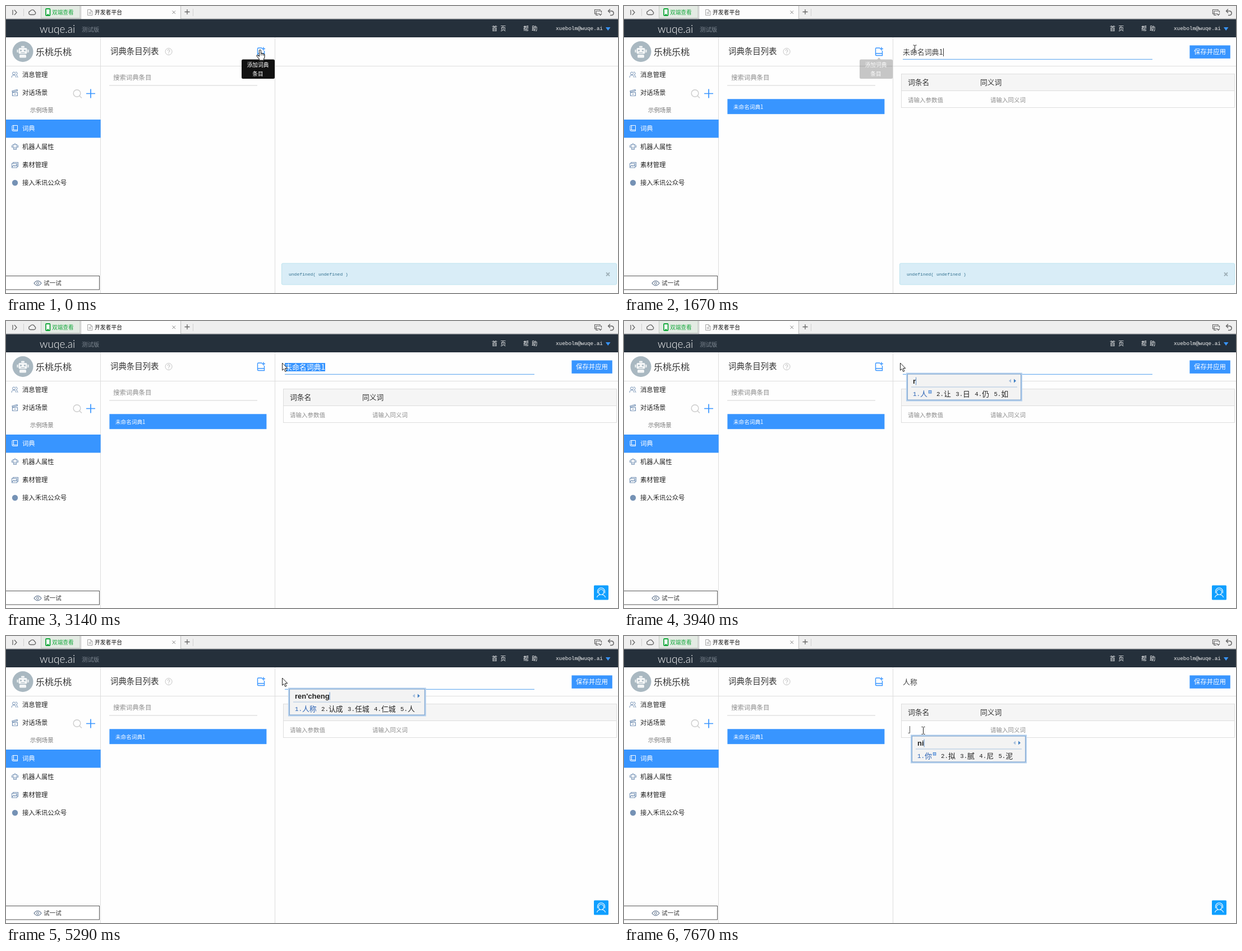
These frames come from a looping animation (1091x513 px, 8000 ms). An HTML page:

```html
<!DOCTYPE html>
<html lang="zh-CN">
<head>
<meta charset="utf-8">
<title>开发者平台</title>
<style>
html, body { margin: 0; width: 100%; height: 100%; overflow: hidden; background: #fff; }
svg { display: block; width: 1091px; height: 513px; font-family: "Noto Sans CJK SC", "Noto Sans CJK", sans-serif; font-weight: 300; }
text { white-space: pre; }
.mono { font-family: "Liberation Mono", monospace; }
.ime { font-family: "Liberation Sans", sans-serif; font-weight: bold; }
.word { font-family: Lato, sans-serif; }
</style>
</head>
<body>
<svg id="stage" viewBox="0 0 1091 513"><g id="base"></g><g id="live"></g></svg>
<script>
const LOOP = 8000, BLUE = '#3895ff', INK = '#333', PALE = '#8c8c8c', RULE = '#ddd';

const text = (x, mid, size, s, fill = INK, more = '') =>
  `<text x="${x}" y="${(mid + size * 0.37).toFixed(2)}" font-size="${size}" fill="${fill}" ${more}>${s}</text>`;
const rect = (x, y, w, h, fill, more = '') =>
  `<rect x="${x}" y="${y}" width="${w}" height="${h}" fill="${fill}" ${more}/>`;
const line = (d, stroke, width = 1, more = '') =>
  `<path d="${d}" fill="none" stroke="${stroke}" stroke-width="${width}" ${more}/>`;
const shape = (d, fill, more = '') => `<path d="${d}" fill="${fill}" ${more}/>`;
const dot = (x, y, r, fill, more = '') => `<circle cx="${x}" cy="${y}" r="${r}" fill="${fill}" ${more}/>`;
const move = (x, y, s) => `<g transform="translate(${x} ${y})">${s}</g>`;

// Latest value whose start time has passed.
const at = (t, steps) => {
  let now = null;
  for (const [start, value] of steps) if (t >= start) now = value;
  return now;
};

function browserBar() {
  return rect(0, 0, 1091, 24, '#efefef') + line('M0 22.5H1091', '#c4c4c4') +
    line('M12 7V16M15 7L19 11.5L15 16', '#666', 1.3) + line('M31.5 5V18M333.5 5V18', '#d0d0d0') +
    line('M43.5 15.5H50A3 3 0 0 0 51 9.8A4.2 4.2 0 0 0 43.2 9.2A3.2 3.2 0 0 0 43.5 15.5Z', '#666', 1.3) +
    rect(62.5, -1, 69, 22.5, '#e4ebe4', 'stroke="#c4c9c4"') +
    rect(71, 5, 7.5, 12, '#fff', 'rx="1" stroke="#14a83b" stroke-width="1.8"') + rect(73, 14.5, 3.5, 1.5, '#14a83b') +
    text(82, 11, 9.7, '双端查看', '#14a83b') +
    rect(133.5, -1, 178, 25, '#fdfdfd', 'stroke="#bbb"') +
    line('M145.5 6.5H151L154 9.5V16.5H145.5ZM151 6.5V9.5H154M147.5 11.5H152M147.5 13.5H152', '#999', .9) +
    text(158, 11, 9.8, '开发者平台', '#111') +
    line('M296.5 8.5L302 14M302 8.5L296.5 14', '#888') +
    line('M318.5 10.5H327.5M323 6V15', '#666', 1.3) +
    line('M1057 14H1049.5V6.5H1059V8M1052 9H1061.5V12M1052 9V16.5H1056M1057 13.5L1059.5 16.5L1062 13.5', '#666', 1.2) +
    line('M1077 5.5L1073.5 9L1077 12.5M1074 9H1080A3.8 3.8 0 0 1 1080 16.5H1077', '#666', 1.4);
}

function header() {
  return rect(0, 23.5, 1091, 32.5, '#25303b') +
    text(60, 41, 19, 'wuqe.ai', '#fff', 'class="word"') +
    text(135, 42, 10.4, '测试版', '#7d8791') +
    text(866, 40, 10, '首 页', '#fff', 'word-spacing="3"') + text(922, 40, 10, '帮 助', '#fff', 'word-spacing="3"') +
    text(980, 39.5, 9.33, 'xuebolm@wuqe.ai', '#f2f2f2', 'class="mono"') +
    shape('M1069 38H1077.5L1073.2 44Z', BLUE);
}

function robot() {
  const tone = '#a9b8c1';
  return dot(30, 81.5, 18.5, tone) +
    rect(22.5, 75, 15, 10.5, '#f4f6f7', 'rx="2"') + rect(19.5, 78, 2, 5, '#f4f6f7') + rect(38.5, 78, 2, 5, '#f4f6f7') +
    rect(27, 71.5, 6, 3, '#f4f6f7', 'rx="1"') +
    dot(26.5, 79.5, 1.6, tone) + dot(33.5, 79.5, 1.6, tone) + rect(26.5, 83, 7, 1, tone) +
    rect(24, 87, 12, 5.5, '#f4f6f7', 'rx="1.5"');
}

function sidebar() {
  const items = ['消息管理', '对话场景', '', '词典', '机器人属性', '素材管理', '接入禾讯公众号'];
  const mids = [123, 155, 0, 219, 252, 284, 316];
  const icon = '#7592b5';
  return robot() + text(53, 82.3, 16, '乐桃乐桃') +
    rect(0, 203, 168.7, 32.5, BLUE) +
    items.map((s, i) => s && text(29, mids[i], 11.35, s, i === 3 ? '#fff' : '#222')).join('') +
    text(43, 186, 10.4, '示例场景', '#777') +
    line('M10 128Q10 123.5 14 123.5Q18 123.5 18 128M14 123A2.5 2.5 0 1 1 14 118A2.5 2.5 0 0 1 14 123M17 118A2.5 2.5 0 0 1 18 123Q21 124 21 128', icon) +
    line('M11.5 154.5H20.5V160.5H11.5ZM11.5 154.5L11 152L20 149.5L20.5 151.5L11.5 154M14 157.5H18', icon, 1.2) +
    line('M11.5 213.5H20.5V223.5H12.5Q11 223.5 11 222V214M13.5 213.5V221M11.5 221.5H20.5', '#fff') +
    line('M12.5 247.5H19.5V253.5H12.5ZM16 247V245M10.5 249V253M21.5 249V253M13 256.5H19M14 254V257M18 254V257M14.5 250V251M17.5 250V251', icon, 1.1) +
    line('M10.5 281.5H19.5V289H10.5ZM12.5 281V279.5H21.5V287H20M11 287.5L14 284.5L16 286.5L18 284L19.5 285.5', icon, 1.1) +
    dot(16, 316, 5.2, icon) +
    dot(126.5, 156, 6.3, 'none', 'stroke="#ccc" stroke-width="1.4"') + line('M131 160.5L135 164.5', '#ccc', 1.4) +
    line('M143 156.5H159M151 148.5V164.5', BLUE, 1.7) +
    rect(-1, 482.5, 167.5, 24.5, '#fff', 'stroke="#555"') +
    line('M50 495.5Q56.5 487 63 495.5Q56.5 504 50 495.5Z', '#566b86', 1.1) +
    dot(56.5, 495.5, 2, 'none', 'stroke="#566b86"') +
    text(67, 495.5, 10.6, '试一试');
}

function middle() {
  return text(186, 81, 14.4, '词典条目列表') +
    dot(290, 81.5, 6, 'none', 'stroke="#c4c4c4"') +
    line('M288 80A2 2 0 1 1 290 82V83.3M290 84.3V85.5', '#bbb') +
    line('M456.5 75H450Q448.5 75 448.5 76.5V87Q448.5 88.5 450 88.5H460.5V80M448.5 86Q448.5 84.8 450 84.8H460.5M459 73.5V79.5M456 76.5H462', BLUE, 1.4) +
    text(191, 128, 11.4, '搜索词典条目', PALE) + line('M184 142H448', '#d2d2d2');
}

function base() {
  return rect(0, 0, 1091, 513, '#fefefe') + browserBar() + header() +
    line('M168.5 56V513M479.5 56V513M0 107.5H1091', RULE) + sidebar() + middle();
}

function table(row) {
  return rect(494.5, 121.5, 594, 60, '#fefefe', `stroke="${RULE}"`) +
    rect(494.5, 121.5, 594, 30, '#f5f5f5', `stroke="${RULE}"`) +
    text(506, 136, 12.8, '词条名') + text(635, 136, 12.8, '同义词') +
    (row ? text(506, 168, 10.5, '请输入参数值', PALE) : '') + text(653, 168, 10.5, '请输入同义词', PALE);
}

function tooltip(alpha) {
  return `<g opacity="${alpha}">` + rect(420, 95.5, 59, 34.5, '#111', 'rx="2.5"') + shape('M451 96L454.5 92L458 96Z', '#111') +
    text(449, 105, 9.7, '添加词典', '#fff', 'text-anchor="middle"') +
    text(449, 121, 9.7, '条目', '#fff', 'text-anchor="middle"') + '</g>';
}

const alertBox = alpha => `<g opacity="${alpha}">` +
  rect(491.5, 460, 597, 38, '#d9edf7', 'rx="2" stroke="#bce3ee"') +
  text(504, 479, 8.03, 'undefined( undefined )', '#31708f', 'class="mono"') +
  line('M1070 476.5L1076 482.5M1076 476.5L1070 482.5', '#9fb0b8', 1.8) + '</g>';

const helpButton = alpha => `<g opacity="${alpha}">` + rect(1048, 472.5, 26, 26, '#0f9fff', 'rx="1.5"') +
  dot(1061, 484.5, 4.7, 'none', 'stroke="#fff" stroke-width="1.1"') +
  line('M1054.5 486.5V483.5A6.5 6.5 0 0 1 1067.5 483.5V486.5M1053.5 494Q1055 489.8 1059 489.3M1063 489.3Q1067 489.8 1068.5 494', '#fff', 1.1) + '</g>';

function title(s, sel) {
  const label = fill => text(497, 82.5, 12.9, s, fill);
  if (sel === null) return label('#444');
  return label('#444') + `<clipPath id="sel">${rect(sel, 75, 569 - sel, 15, '#000')}</clipPath>` +
    rect(sel, 75, 569 - sel, 15, BLUE) + `<g clip-path="url(#sel)">${label('#fff')}</g>`;
}

// Input-method window: typed letters above five numbered candidates.
function ime(x, y, typed, words, star) {
  const em = 12.9;
  const caretX = 11.5 + [...typed].reduce((sum, c) => sum + 13 * ({ r: .39, i: .28, "'": .24, n: .61, h: .61, g: .61 }[c] || .556), 0);
  let pen = 11, list = '';
  words.split(' ').forEach((w, i) => {
    const fill = i ? '#222' : '#2b62b4';
    list += text(pen, 36.8, 10.75, i + 1 + '.', fill, 'class="mono"') + text(pen + em, 36.5, em, w, fill);
    pen += em * (1 + w.length);
    if (!i && star) {
      list += rect(pen + 2.5, 31, 4.5, 4.5, '#dceaff', 'stroke="#3c7ccc"') + rect(pen + 4, 32.5, 1.5, 1.5, '#3c7ccc');
      pen += 8;
    }
    pen += 8.3;
  });
  const w = Math.max(205, pen - 8.3 + 19);
  return move(x, y, rect(.5, .5, w - 1, 48, '#f3f3f3', 'stroke="#b3cfed" stroke-width="3"') +
    rect(1.5, 1.5, w - 3, 46, '#f3f3f3', 'stroke="#7ba1cc"') +
    text(11, 13.6, 13, typed, '#222', 'class="ime"') + line(`M${caretX} 7V21`, '#5b8dc8') +
    line(`M8 24.5H${w - 8}`, '#a8c2df') +
    shape(`M${w - 23} 13.5L${w - 19} 10V17Z`, '#a5bfdd') + shape(`M${w - 10} 13.5L${w - 14} 10V17Z`, '#3f7fc4') + list);
}

const cursors = {
  arrow: shape('M0 0V13.2L3 10.5L5.2 15.5L7.4 14.5L5.2 9.6H9.3Z', '#fff', 'stroke="#222" stroke-width="1"'),
  beam: line('M-3 -6.5H-1L0 -5.5L1 -6.5H3M0 -5.5V5.5M-3 6.5H-1L0 5.5L1 6.5H3', '#222', 1),
  hand: shape('M-1.5 9V1.5Q0 -1 1.5 1.5V7Q3 5.5 4 7.3Q5.5 6.3 6.3 8Q8 7.5 8 9.5V13Q8 15 6.5 16.5V19H-1.5V17L-6 11.5Q-6.3 9 -4 10L-1.5 12Z', '#fff', 'stroke="#222" stroke-width="1.1" stroke-linejoin="round"') +
    line('M1.5 7V10.5M4 7.5V10.5M6.3 8.5V11', '#222', .8)
};

const pointer = [
  [0, ['hand', 453, 78]], [1670, ['beam', 518.5, 76.5]], [1820, ['beam', 535.5, 76]], [1940, ['beam', 556.5, 76]],
  [2060, ['beam', 575.5, 76]], [2180, ['beam', 590.5, 76]], [2330, ['beam', 591.5, 81]], [2480, ['beam', 566.5, 80]],
  [2600, ['beam', 528.5, 78]], [2720, ['beam', 498.5, 76]], [2870, ['arrow', 492.5, 75]], [6280, ['arrow', 500, 142.5]],
  [6430, ['arrow', 509, 160]], [6550, ['arrow', 522.5, 182]], [6700, ['beam', 533.5, 169]]
];
const typing = [
  [3940, ['r', '人 让 日 仍 如', 1]], [4190, ['re', '热 惹 若 喏 偌', 0]], [4470, ['ren', '人 任 认 仁 忍', 1]],
  [4930, ["ren'ch", '人称 认出 人丑 人吃 人场', 0]], [5050, ["ren'che", '人车 认车 人车分离 人撤 仁车', 0]],
  [5170, ["ren'chen", '人臣 人沉 认沉 仁臣 忍沉', 0]], [5290, ["ren'cheng", '人称 认成 任城 仁城 人', 0]],
  [5750, null], [7550, ['n', '你 呢 那 能 年', 1]], [7670, ['ni', '你 拟 腻 尼 泥', 1]]
];
const titles = [[0, ''], [1250, '未命名词典1'], [3390, ''], [5750, '人称']];
const selection = [[0, null], [2480, 561.5], [2600, 523], [2720, 497], [3390, null]];
const titleCaret = [[1400, 569.5], [2480, null], [3390, 497.5], [3940, null], [5750, 523.5], [6280, null], [6430, 523.5], [6850, null]];
const listAlpha = [[0, 0], [1400, .4], [1520, .75], [1670, 1]];
const tipAlpha = [[0, 1], [1670, .23], [1820, .12], [1940, .04], [2060, 0]];
const swap = [[0, 0], [3020, .5], [3140, 1]];

function scene(t) {
  let out = '';
  const list = at(t, listAlpha), tip = at(t, tipAlpha), swapped = at(t, swap);
  if (list) out += `<g opacity="${list}">${rect(184.4, 166.3, 280, 26.9, BLUE)}${text(195, 180, 9.65, '未命名词典1', '#fff')}</g>`;
  if (t >= 1250) {
    out += rect(1008.4, 70.4, 72.4, 23.4, BLUE) + text(1016, 82, 11.4, '保存并应用', '#fff') + table(t < 7550);
    if (t >= 1400 && t < 6850) out += line('M497 95.3H942', '#509fee');
    out += title(at(t, titles), at(t, selection));
    if (t >= 3390 && t < 3940) out += text(497, 82.5, 12.6, '请输入词典名称', PALE);
    const caret = at(t, titleCaret);
    if (caret) out += line(`M${caret} 75.5V90`, '#333');
    if (t >= 6850 && t < 7400) out += line('M506.5 161V174', '#333');
    if (t >= 7550) out += line('M509.5 161V173.5H506.5', '#555');
  }
  if (swapped < 1) out += alertBox(1 - swapped);
  if (swapped) out += helpButton(swapped);
  if (tip) out += tooltip(tip);
  const keys = at(t, typing);
  if (keys) out += t < 7000 ? ime(504, 93.5, ...keys) : ime(512, 177.5, ...keys);
  const [kind, x, y] = at(t, pointer);
  return out + move(x, y, cursors[kind]);
}

const live = document.getElementById('live');
document.getElementById('base').innerHTML = base();
let shown = '', begin = null;
function render(t) {
  const next = scene(t);
  if (next !== shown) live.innerHTML = shown = next;
}
function tick(now) {
  if (begin === null) begin = now;
  render((now - begin) % LOOP);
  requestAnimationFrame(tick);
}
render(0);
requestAnimationFrame(tick);
</script>
</body>
</html>
```
